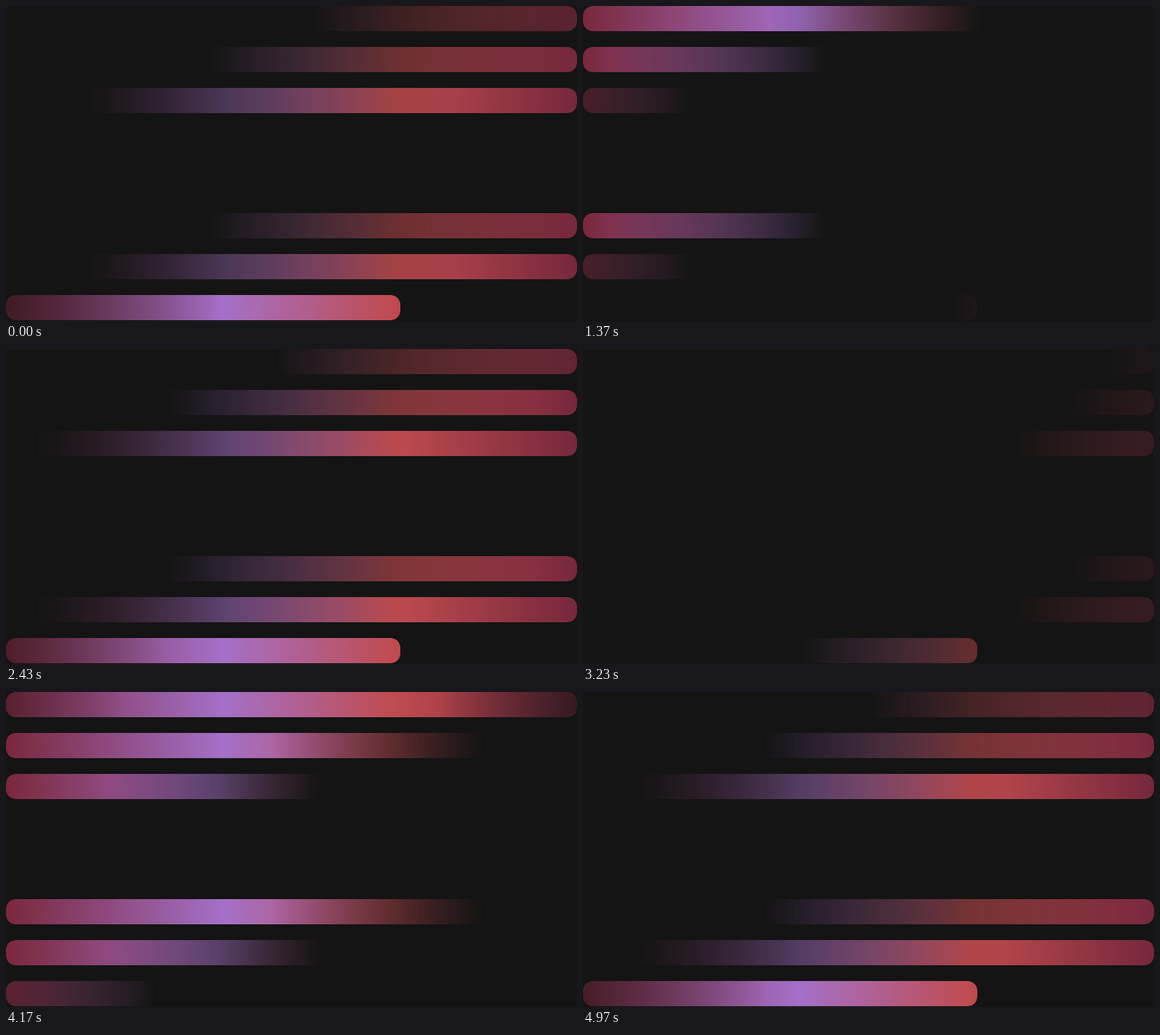
Recreate the animation shown at these times as an HTML page. Size 724 by 400 pixels, loop 5010 ms.

```html
<!DOCTYPE html>
<html lang="en">
<head>
<meta charset="utf-8">
<title>Skeleton loader</title>
<style>
  html, body {
    margin: 0;
    width: 100%;
    height: 100%;
    overflow: hidden;
    background: #141414;
  }
  .stage {
    position: relative;
    width: 724px;
    height: 400px;
    overflow: hidden;
  }
  .bar {
    --band: linear-gradient(90deg, transparent, #000 470px, #000 870px, transparent 1140px);
    --end: 672px;
    position: absolute;
    left: 0;
    top: var(--y);
    width: 724px;
    height: 32px;
    border-radius: 12px;
    background: linear-gradient(90deg, #7a283c, #a470c8 275px, #c04b4f 490px, #76283c 724px);
    -webkit-mask: var(--band) -1125px 0 / 1140px 100% no-repeat;
    mask: var(--band) -1125px 0 / 1140px 100% no-repeat;
    animation: sweep 2505ms cubic-bezier(.28, .2, .49, .88) infinite;
    /* each step follows the previous one by 200 ms */
    animation-delay: calc(-1730ms + var(--step) * 200ms);
  }
  .short {
    --end: 465px;
    width: 500px;
  }
  @keyframes sweep {
    from { -webkit-mask-position: -1125px 0; mask-position: -1125px 0; }
    to { -webkit-mask-position: var(--end) 0; mask-position: var(--end) 0; }
  }
</style>
</head>
<body>
<div class="stage">
  <div class="bar" style="--y: 0px; --step: 0"></div>
  <div class="bar" style="--y: 52px; --step: 1"></div>
  <div class="bar" style="--y: 104px; --step: 2"></div>
  <div class="bar" style="--y: 263px; --step: 1"></div>
  <div class="bar" style="--y: 315px; --step: 2"></div>
  <div class="bar short" style="--y: 367px; --step: 3"></div>
</div>
</body>
</html>
```
